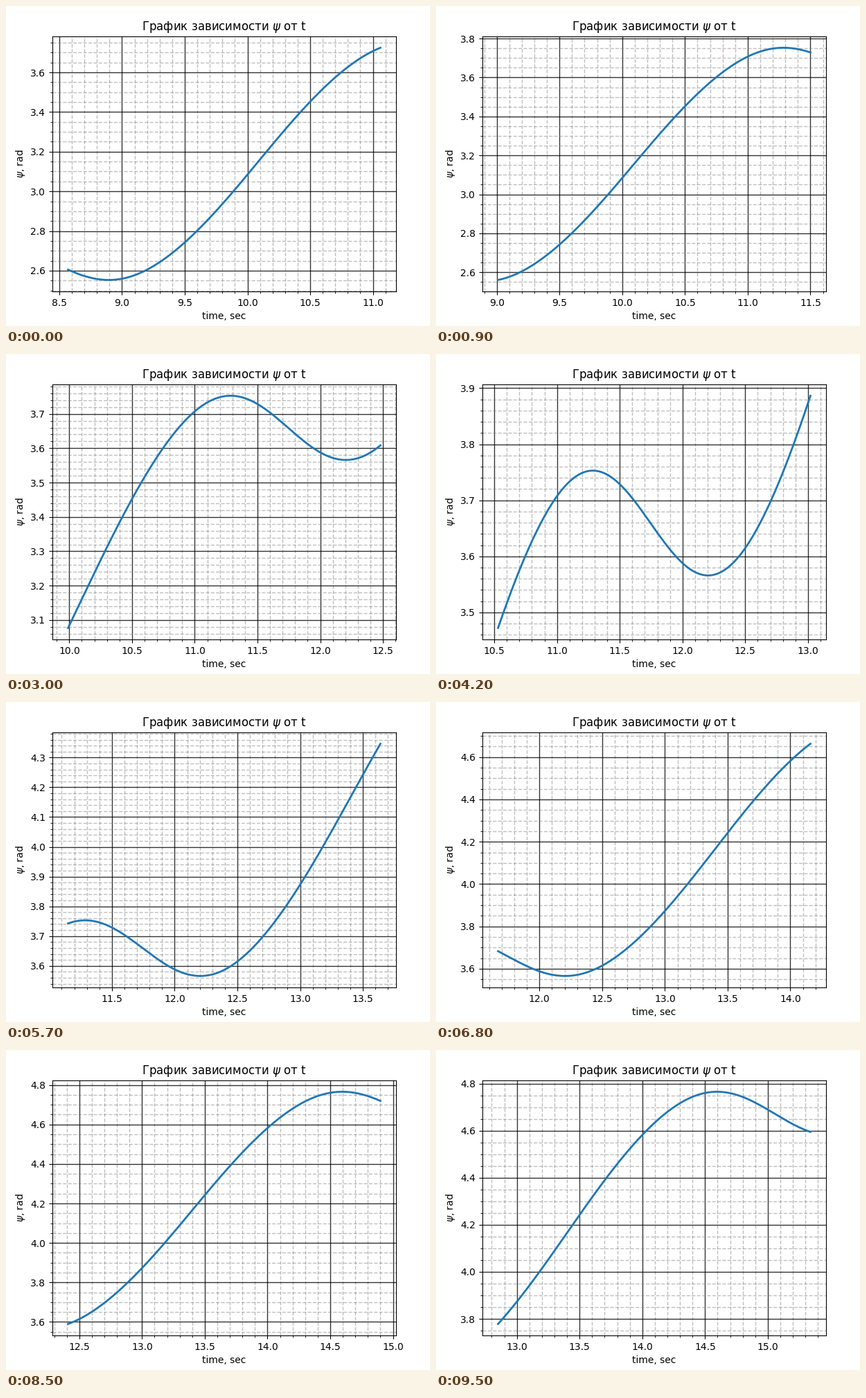
Animation of 612 by 463 pixels, one loop 9.6 s. Source, as a matplotlib script:

```python
import numpy as np
import matplotlib.pyplot as plt
from matplotlib.animation import FuncAnimation

W, H, DPI = 612, 463, 100
FRAMES, INTERVAL = 96, 100

# Precession angle: steady drift plus a periodic nutation term
PERIOD, DRIFT = 3.31, 1.0128
T_MID, PSI_MID = 11.745, 3.6594
HARMONICS = (0.2755, 0.0218, 0.0033)

# Left end of the time window, paced unevenly like a live run
KEY_FRAMES = (0, 17, 42, 57, 68, 85, 95)
KEY_STARTS = (8.57, 9.41, 10.53, 11.15, 11.67, 12.41, 12.85)
DT, POINTS = 0.01, 250


def psi(t):
    s = t - T_MID
    w = 2 * np.pi / PERIOD
    wave = sum(b * np.sin(k * w * s) for k, b in enumerate(HARMONICS, 1))
    return PSI_MID + DRIFT * s / PERIOD - wave


def padded(values, margin=0.05):
    low, high = values.min(), values.max()
    pad = margin * (high - low)
    return low - pad, high + pad


fig = plt.figure(figsize=(W / DPI, H / DPI), dpi=DPI)
ax = fig.add_axes([67 / W, 49.8 / H, 496 / W, 369.6 / H])
ax.set_title(r"График зависимости $\psi$ от t")
ax.set_xlabel("time, sec")
ax.set_ylabel(r"$\psi$, rad")
ax.minorticks_on()
ax.grid(which="major", color="black", linewidth=1, alpha=0.8)
ax.grid(which="minor", color="gray", linewidth=1, linestyle="--", alpha=0.5)
curve, = ax.plot([], [], color="tab:blue", linewidth=2)


def update(frame):
    start = round(float(np.interp(frame, KEY_FRAMES, KEY_STARTS)), 2)
    t = start + DT * np.arange(POINTS)
    y = psi(t)
    curve.set_data(t, y)
    ax.set_xlim(padded(t))
    ax.set_ylim(padded(y))
    return curve,


anim = FuncAnimation(fig, update, frames=FRAMES, interval=INTERVAL,
                     repeat=True, repeat_delay=0, blit=False)
plt.show()
```
